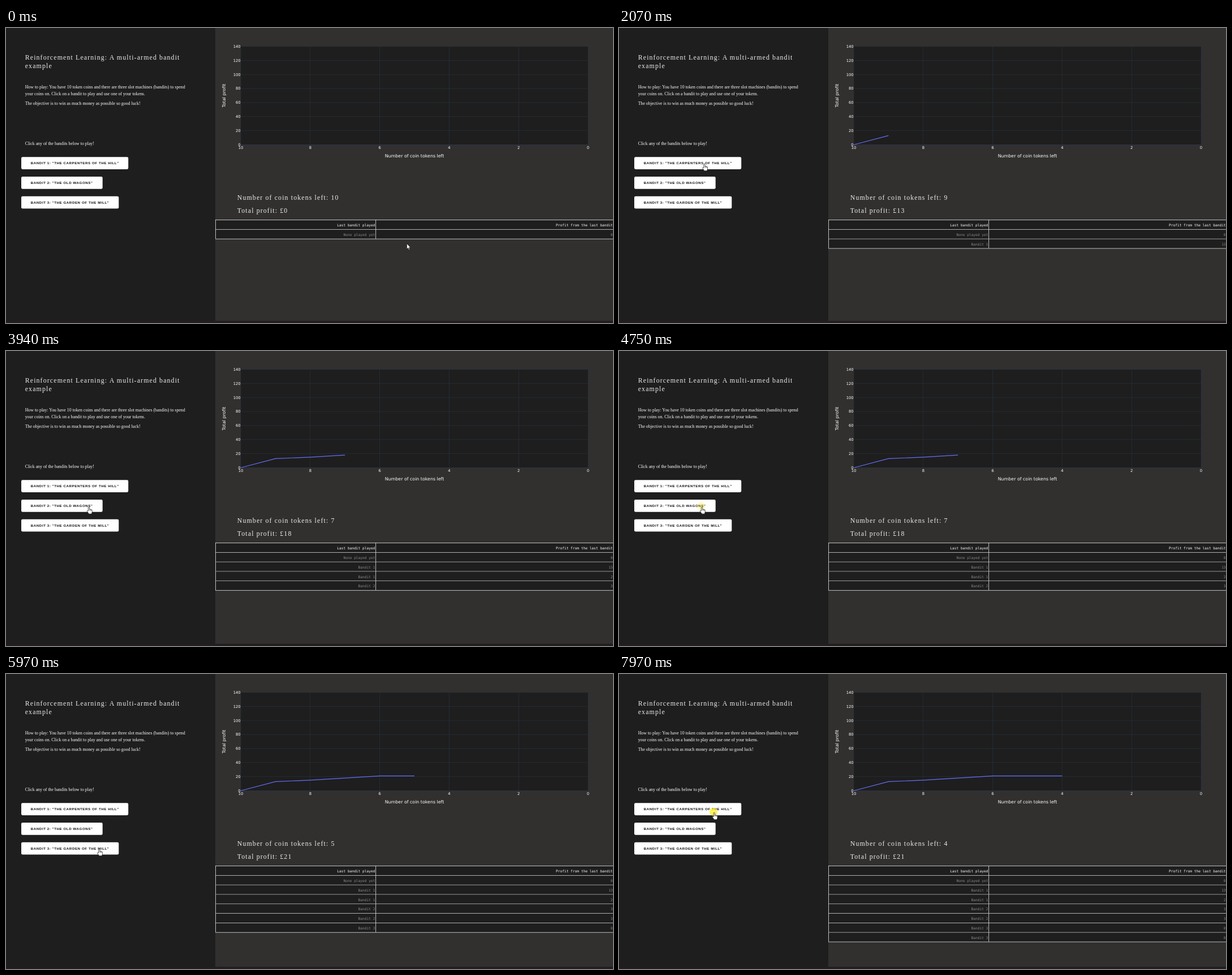
An HTML page for the animation above (8 s loop, 1073 by 522 pixels).

```html
<!DOCTYPE html>
<html lang="en">
<head>
<meta charset="utf-8">
<title>Multi-armed bandit</title>
<style>
  html, body { margin: 0; width: 100%; height: 100%; overflow: hidden; background: #1e1e1e; }
  svg { display: block; width: 1073px; height: 522px; }
  text { fill: #fff; white-space: pre; }
  .head { font: 11.9px "Liberation Serif", serif; letter-spacing: 1.12px; fill: #ececec; }
  .body { font: 7.85px "Liberation Serif", serif; }
  .btn { font: bold 6.18px "Liberation Sans", sans-serif; letter-spacing: .565px; fill: #111; }
  .tick { font: 6.78px "DejaVu Sans", sans-serif; }
  .axis { font: 7.9px "DejaVu Sans", sans-serif; }
  .cell { font: 6.2px "DejaVu Sans Mono", monospace; text-anchor: end; }
  .dim { fill: #888; }
  .mid { text-anchor: middle; }
  .end { text-anchor: end; }
</style>
</head>
<body>
<svg id="stage" viewBox="0 0 1073 522"></svg>
<script>
const LOOP = 8000, STEP = 68;
const stage = document.getElementById('stage');

function add(tag, attrs, parent = stage) {
  const el = document.createElementNS('http://www.w3.org/2000/svg', tag);
  for (const k in attrs) el.setAttribute(k, attrs[k]);
  parent.appendChild(el);
  return el;
}
function rect(x, y, width, height, fill, extra, parent) {
  return add('rect', { x, y, width, height, fill, ...extra }, parent);
}
function label(str, x, y, cls, extra, parent) {
  const el = add('text', { x, y, class: cls, ...extra }, parent);
  el.textContent = str;
  return el;
}
function show(el, on) { el.setAttribute('visibility', on ? 'visible' : 'hidden'); }

// Panels
rect(0, 0, 370, 522, '#1e1e1e');
rect(370, 0, 703, 522, '#31302f');
rect(0, 518, 1073, 4, '#231d20');

// Left column
label('Reinforcement Learning: A multi-armed bandit', 33.7, 56, 'head');
label('example', 33.7, 71, 'head');
label('How to play: You have 10 token coins and there are three slot machines (bandits) to spend', 33.7, 106.7, 'body');
label('your coins on. Click on a bandit to play and use one of your tokens.', 33.7, 119, 'body');
label('The objective is to win as much money as possible so good luck!', 33.7, 135.8, 'body');
label('Click any of the bandits below to play!', 33.7, 206.5, 'body');

const BTN_H = 21.7;
const buttons = [
  { name: 'THE CARPENTERS OF THE HILL', w: 189.2 },
  { name: 'THE OLD WAGONS', w: 143.7 },
  { name: 'THE GARDEN OF THE MILL', w: 172.3 }
];
buttons.forEach((b, i) => {
  b.y = 228.2 + 34.8 * i;
  rect(27, b.y, b.w, BTN_H, '#fff', { rx: 2.3 });
  label(`BANDIT ${i + 1}: "${b.name}"`, 43.8, b.y + 13.2, 'btn');
});

// Chart
const chartX = coins => 415 + (10 - coins) * 61.4;
const chartY = profit => 206.5 - profit * 174 / 140;
rect(415, 32.5, 614, 174, '#1e1e1e');
for (let c = 10; c >= 0; c -= 2) {
  rect(chartX(c) - .3, 32.5, c ? .6 : 1.1, 174, '#283442');
  label(c, chartX(c), 213.8, 'tick mid');
}
for (let p = 0; p <= 140; p += 20) {
  rect(415, chartY(p) - .3, 614, p ? .6 : 1.1, '#283442');
  label(p, 414.6, chartY(p) + 2.4, 'tick end');
}
label('Number of coin tokens left', 722, 229.2, 'axis mid');
label('Total profit', 0, 0, 'axis mid', { transform: 'translate(387.6 119.5) rotate(-90)' });
const curve = add('polyline', { fill: 'none', stroke: '#636efa', 'stroke-width': 1.15 });

// Each play: highlight on/off, table update, curve start/end
const plays = [
  { on: 1310, off: 1580, row: 1650, from: 1860, to: 2070, bandit: 1, profit: 13 },
  { on: 2670, off: 2800, row: 2860, from: 2860, to: 2860, bandit: 1, profit: 2 },
  { on: 3600, off: 3800, row: 3940, from: 3940, to: 3940, bandit: 2, profit: 3 },
  { on: 4610, off: 4820, row: 4890, from: 5030, to: 5230, bandit: 2, profit: 3 },
  { on: 5770, off: 5910, row: 5970, from: 5970, to: 5970, bandit: 3, profit: 0 },
  { on: 6430, off: 6570, row: 6630, from: 6630, to: 6630, bandit: 3, profit: 0 },
  { on: 7970, off: 8200, row: 9000, from: 9000, to: 9000 }
];

// Counters and table
const coinsText = label('', 408.7, 304, 'head');
const profitText = label('', 408.7, 327.3, 'head');
const ROW_H = 16.8, RULE = .9, RULE_COLOR = '#d2d2d2';

function tableRow(k, left, right, cls) {
  const g = add('g', {});
  const top = 339.2 + ROW_H * k;
  rect(370, top + RULE, 703, ROW_H, '#1e1e1e', {}, g);
  if (!k) rect(370, top, 703, RULE, RULE_COLOR, {}, g);
  rect(370, top + ROW_H, 703, RULE, RULE_COLOR, {}, g);
  for (const x of [370, 653.2]) rect(x, top, RULE, ROW_H, RULE_COLOR, {}, g);
  label(left, 652.4, top + 11.9, cls, {}, g);
  label(right, 1072.6, top + 11.9, cls, {}, g);
  return g;
}
tableRow(0, 'Last bandit played', 'Profit from the last bandit', 'cell');
tableRow(1, 'None played yet', '0', 'cell dim');
plays.forEach((p, i) => {
  if (p.bandit) p.el = tableRow(i + 2, 'Bandit ' + p.bandit, p.profit, 'cell dim');
});

// Pointer
const glow = add('circle', { r: 7, fill: '#ffec1a' });
const pointer = add('g', { fill: '#fff', stroke: '#111', 'stroke-width': .7, 'stroke-linejoin': 'round' });
const arrow = add('path', { d: 'M0 0V9.7L2.2 7.7 3.7 11.2 5.3 10.5 3.8 7.2H6.6Z' }, pointer);
const hand = add('path', {
  transform: 'translate(.8 .9)',
  d: 'M-.6 7.8V1.3Q-.6 .3 .5 .3T1.6 1.3V4.6Q2.7 4 3.3 5Q4.4 4.5 4.9 5.5Q6.2 5.2 6.2 6.9V9.3Q6 11 5.2 12.8H.4Q-.4 11.2-2.6 8.4Q-3.1 7.2-1.9 7Q-1.2 7-.6 7.8ZM1.6 4.8V7M3.3 5.2V7M4.9 5.7V7.2'
}, pointer);

const start = { x: 708.6, y: 381.5 };
const moves = [
  { t: 70, n: 3, dt: 80, x: 320.5, y: 234.6 },
  { t: 760, n: 6, dt: 70, x: 149.5, y: 239 },
  { t: 3190, n: 5, dt: STEP, x: 145.2, y: 274.5 },
  { t: 5370, n: 4, dt: 66, x: 163.4, y: 308 },
  { t: 7360, n: 7, dt: STEP, x: 167, y: 244 }
];
const ease = u => u * u * (3 - 2 * u);

function pointerAt(t) {
  let { x, y } = start;
  for (const m of moves) {
    if (t < m.t) break;
    const k = Math.min(m.n, Math.floor((t - m.t) / m.dt) + 1);
    const u = ease(k / m.n);
    x += (m.x - x) * u;
    y += (m.y - y) * u;
  }
  return { x, y };
}

function draw(t) {
  let coins = 10, total = 0, height = 0;
  const points = [[chartX(10), chartY(0)]];
  plays.forEach((p, i) => {
    if (p.el) show(p.el, t >= p.row);
    if (t >= p.row) { coins--; total += p.profit; }
    if (t >= p.from) {
      const u = p.to === p.from ? 1 : Math.min(1, (Math.floor((t - p.from) / STEP) + 1) / 4);
      height += p.profit * u;
      points.push([chartX(10 - i - u), chartY(height)]);
    }
  });
  curve.setAttribute('points', points.join(' '));
  coinsText.textContent = 'Number of coin tokens left: ' + coins;
  profitText.textContent = 'Total profit: £' + total;

  const { x, y } = pointerAt(t);
  const over = buttons.some(b => x >= 27 && x <= 27 + b.w && y >= b.y && y <= b.y + BTN_H);
  pointer.setAttribute('transform', `translate(${x} ${y})`);
  show(hand, over);
  show(arrow, !over);

  const click = plays.find(p => t >= p.on && t < p.off);
  show(glow, click);
  if (click) {
    glow.setAttribute('cx', x);
    glow.setAttribute('cy', y);
    glow.setAttribute('opacity', t - click.on < 2 * STEP ? .72 : .3);
  }
}

const begin = performance.now();
function tick() {
  draw((performance.now() - begin) % LOOP);
  requestAnimationFrame(tick);
}
tick();
</script>
</body>
</html>
```
